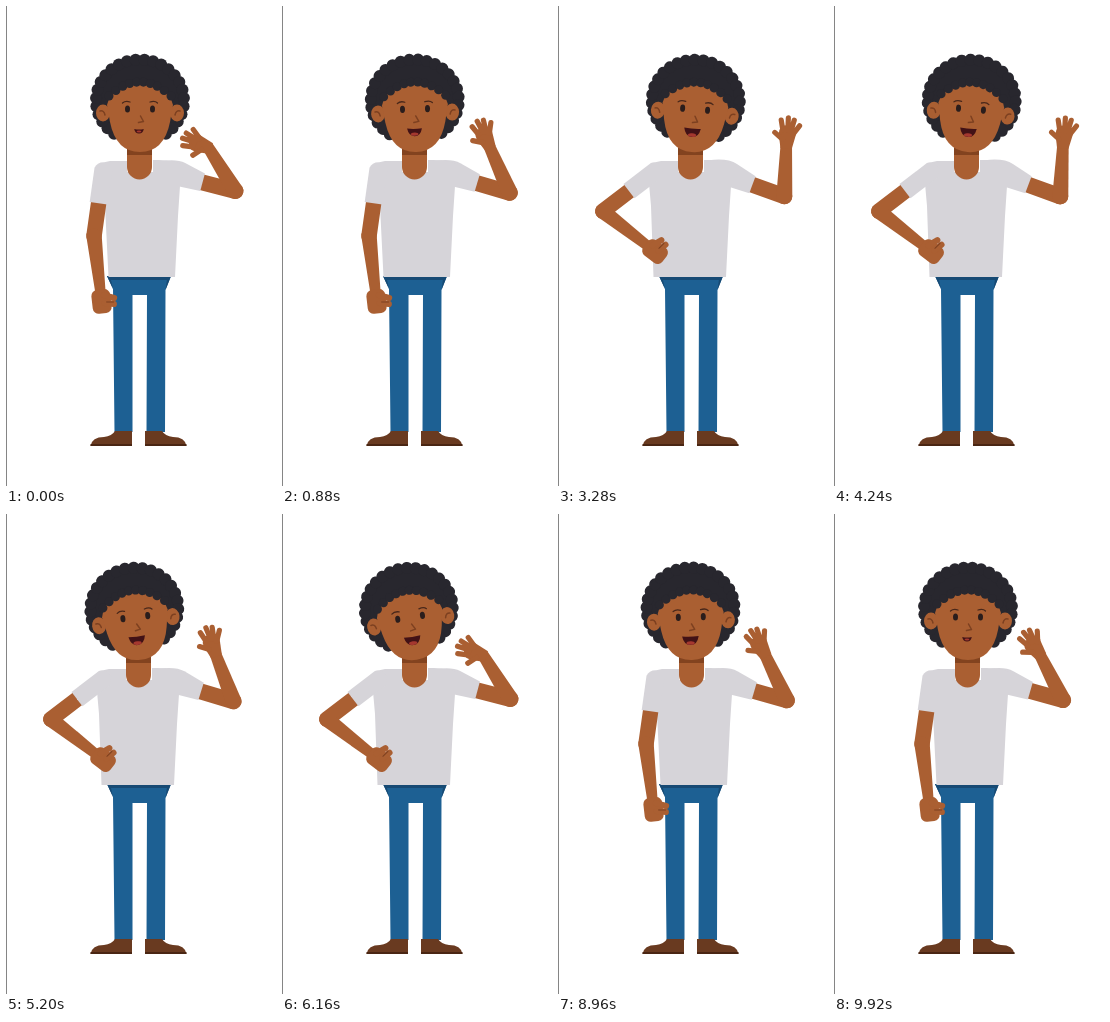
An HTML page for the animation above (10000 ms loop, 270 by 480 pixels).

```html
<!DOCTYPE html>
<html lang="en">
<head>
<meta charset="utf-8">
<title>Waving person</title>
<style>
  html, body { margin: 0; width: 100%; height: 100%; overflow: hidden; background: #fff; }
  svg { display: block; width: 100%; height: 100%; }
  .skin { fill: #aa5f32; }
  .limb { fill: none; stroke: #aa5f32; stroke-linecap: round; stroke-linejoin: round; }
  .shirt { fill: #d6d4d9; }
  .hair { fill: #28272e; }
  .jeans { fill: #1d6093; }
  .shoe { fill: #693a20; }
  .line { fill: none; stroke: #7d4020; stroke-width: 1.5; stroke-linecap: round; stroke-linejoin: round; }
</style>
</head>
<body>
<svg viewBox="0 0 270 480">
  <rect width="1" height="480" fill="#858585"/>

  <g id="legs">
    <path class="jeans" d="M101 270H165L159.500 284L159 426H140.500L141 289H126.500V426H108.500L107 283Z"/>
    <path fill="#174a74" d="M101 270H165L163.500 274H105L107 283Z M165 270L159.500 284L161 273Z"/>
    <g id="shoe">
      <path class="shoe" d="M109 425H126V440H84.500Q86 431 98 431Q106 430 109 425Z"/>
      <path fill="#4a2613" d="M84.500 438H126V440H84.500Z"/>
    </g>
    <use href="#shoe" transform="translate(265 0) scale(-1 1)"/>
  </g>

  <g id="body">
    <g id="wave">
      <path class="limb" stroke-width="16" d="M184 175L227 191"/>
      <g id="fore">
        <path class="skin" d="M-8 0L-5.700 -52H5.700L8 0A8 8 0 0 1 -8 0Z"/>
        <g id="hand">
          <path class="skin" d="M-5.700 3L-8 -11Q-8 -20 0 -20Q9 -20 9.500 -12L5.700 3Z"/>
          <path class="limb" stroke-width="5.200" d="M-4 -15L-6 -25M1 -15L1 -27.500M4 -14L7 -25.500M6 -11L12.500 -20M-4 -6L-12 -12.500"/>
        </g>
      </g>
      <path class="shirt" d="M152 154Q171 152 180 158L198.500 170.500L192 187.500L166 179Z"/>
    </g>

    <path id="torso" class="shirt"/>

    <g id="upper">
      <path class="limb" stroke-width="15.500" d="M0 26V64.500"/>
      <g id="lower">
        <path class="skin" d="M-7.700 0L-5.200 56H5.200L7.700 0A7.700 7.700 0 0 0 -7.700 0Z"/>
        <rect class="skin" x="-9.500" y="54" width="19" height="24" rx="6"/>
        <path class="limb" stroke-width="6" d="M3 60L13 64M3 68L12 70"/>
        <path class="line" style="stroke-width:1" d="M5 67L12 68"/>
      </g>
      <path class="shirt" d="M-9 -3Q-7 -10 2 -10L9 -4V31.500H-9Z"/>
    </g>

    <path class="skin" d="M121 138H146V161A12.500 12.500 0 0 1 121 161Z"/>
    <path fill="#83431f" d="M121 142H146V149H121Z"/>
  </g>

  <g id="head">
    <g id="curls" class="hair"><ellipse cx="134" cy="95" rx="46" ry="41"/></g>
    <ellipse class="skin" cx="97" cy="107" rx="7" ry="8.500"/>
    <ellipse class="skin" cx="171" cy="107" rx="7" ry="8.500"/>
    <path class="line" d="M94 105Q98 104 99 109M174 105Q170 104 169 109"/>
    <path class="skin" d="M101 99Q106 78 134 77Q162 78 167 99L164 116Q158 146 134 146Q110 146 104 116Z"/>
    <g id="fringe" class="hair"></g>
    <g fill="#2a1d1c">
      <ellipse cx="121.500" cy="103" rx="2.500" ry="3.600"/>
      <ellipse cx="146.500" cy="103" rx="2.500" ry="3.600"/>
    </g>
    <path class="line" style="stroke:#4a281a;stroke-width:1.300" d="M116.500 97Q119.500 94.500 124 96M144 96Q149 94.500 151.500 97"/>
    <path class="line" d="M134.500 110L137.500 115.500L132.500 116.500"/>
    <path id="mouth" fill="#421216"/>
    <ellipse id="tongue" fill="#a5382f" cx="133"/>
  </g>
</svg>
<script>
  const LOOP = 10000, STEP = 80;
  const $ = id => document.getElementById(id);
  const parts = {};
  for (const id of ['body', 'wave', 'fore', 'hand', 'torso', 'upper', 'lower', 'head', 'mouth', 'tongue'])
    parts[id] = $(id);

  // Tracks of [time, value]; the phase counts waves
  const PHASE = [[0, 0], [880, .87], [2400, 2.38], [4240, 4.306], [6160, 6], [7920, 7.787], [9920, 9.9], [LOOP, 10]];
  const TILT = [[0, 0], [880, -1.5], [1900, 5], [4240, 4.5], [5500, -9], [7920, -8.5], [9400, 0], [LOOP, 0]];
  const HIP = [[0, 0], [1020, 0], [1780, 1], [7000, 1], [7760, 0], [LOOP, 0]];
  const SMILE = [[0, 0], [700, .75], [1000, .75], [2200, 1], [9400, 1], [9880, 0], [LOOP, 0]];
  const LEAN = [[0, 0], [880, -1], [6400, -1], [7700, 0], [LOOP, 0]];

  const linear = x => x;
  const smooth = x => x * x * (3 - 2 * x);
  const mix = (a, b, x) => a + (b - a) * x;

  function at(track, t, ease = smooth) {
    const i = track.findIndex(k => k[0] > t);
    const [t0, a] = track[i - 1], [t1, b] = track[i];
    return mix(a, b, ease((t - t0) / (t1 - t0)));
  }

  function curl(group, x, y, r) {
    const c = document.createElementNS('http://www.w3.org/2000/svg', 'circle');
    c.setAttribute('cx', x);
    c.setAttribute('cy', y);
    c.setAttribute('r', r);
    group.append(c);
  }

  // Curls around the hair and along the hairline
  for (let i = 0; i < 26; i++) {
    const a = (126 + i * 288 / 25) * Math.PI / 180;
    curl($('curls'), 134 + 44 * Math.cos(a), 94.5 + 41 * Math.sin(a), 6);
  }
  for (let i = 0; i < 10; i++) {
    const x = i / 4.5 - 1;
    curl($('fringe'), 134 + 31 * x, 76 + 14 * x * x, 4.5);
  }

  const move = (part, value) => part.setAttribute('transform', value);

  function pose(t) {
    const c = -Math.cos(2 * Math.PI * at(PHASE, t, linear));
    const lift = 6 * ((1 - c) / 2) ** 2;
    move(parts.wave, `rotate(${-lift} 170 165)`);
    // The forearm angle is absolute, so the shoulder turn is taken out
    move(parts.fore, `translate(227 191) rotate(${-6 + 26 * c + lift})`);
    move(parts.hand, `translate(0 -51) rotate(${-40 * Math.max(0, -c) ** 6})`);

    const hip = at(HIP, t);
    const up = mix(8, 52.5, hip), low = mix(-6.5, -52.3, hip);
    move(parts.upper, `translate(97 166) rotate(${up})`);
    move(parts.lower, `translate(0 64.5) rotate(${low - up})`);
    parts.torso.setAttribute('d',
      `M121 155L104 155Q94 156 91 166L${mix(99, 94, hip)} 200L${mix(102.5, 96.5, hip)} 271H169` +
      `L172 210L174 180L180 160Q170 153 147 154V166H121Z`);

    const lean = at(LEAN, t);
    move(parts.body, `translate(${lean} 0)`);
    move(parts.head, `rotate(${at(TILT, t)} 133 141)`);

    const m = at(SMILE, t), w = 4.8 + 3.5 * m, h = 4.6 + 4.2 * m, y = 123 - .8 * m;
    parts.mouth.setAttribute('d',
      `M${133 - w} ${y}Q133 ${y + 1} ${133 + w} ${y}Q${133 + w * .8} ${y + h} 133 ${y + h}` +
      `Q${133 - w * .8} ${y + h} ${133 - w} ${y}Z`);
    parts.tongue.setAttribute('cy', y + h - 2);
    parts.tongue.setAttribute('rx', w * .5);
    parts.tongue.setAttribute('ry', 1 + m * .8);
  }

  const start = performance.now();
  function tick() {
    const t = (performance.now() - start) % LOOP;
    pose(Math.floor(t / STEP) * STEP);
    requestAnimationFrame(tick);
  }
  tick();
</script>
</body>
</html>
```
